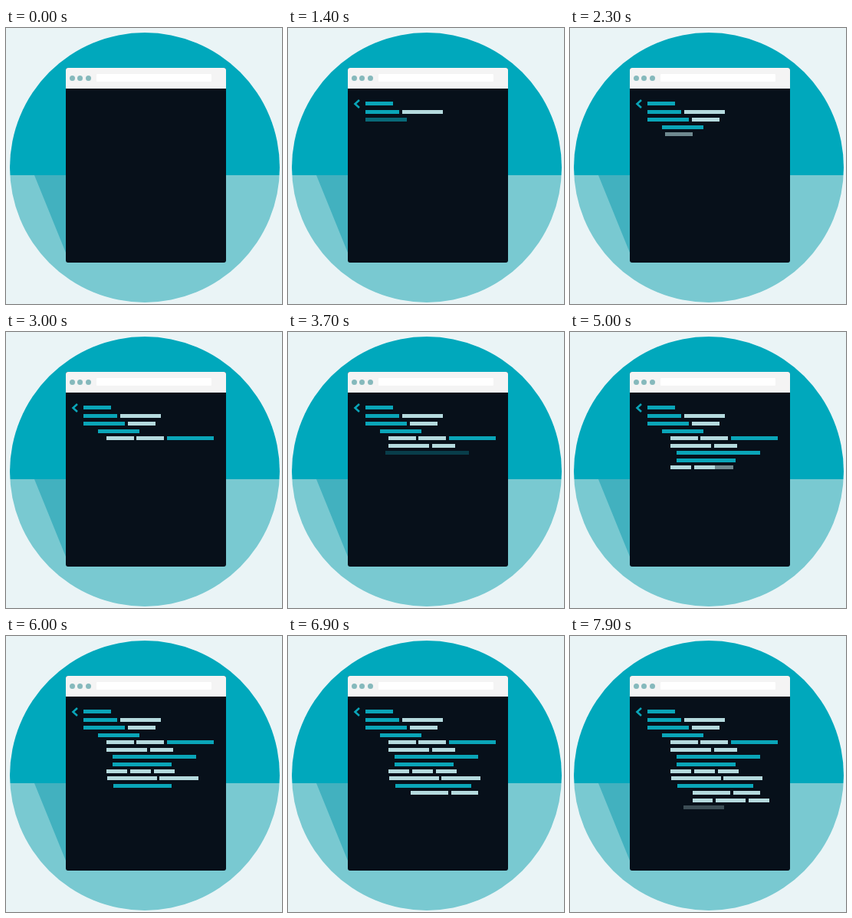
These frames come from a looping animation (360x360 px, 8000 ms). An HTML page:

```html
<!DOCTYPE html>
<html lang="en">
<head>
<meta charset="utf-8">
<title>Code window</title>
<style>
  html, body { margin: 0; width: 100%; height: 100%; overflow: hidden; background: #eaf4f6; }
  svg { display: block; width: 100vw; height: 100vh; }
</style>
</head>
<body>
<svg viewBox="0 0 360 360">
  <defs>
    <clipPath id="disc"><circle cx="181" cy="182" r="176"/></clipPath>
  </defs>
  <g clip-path="url(#disc)">
    <rect width="360" height="192" fill="#00a8bc"/>
    <rect y="192" width="360" height="168" fill="#79c9d1"/>
    <path d="M37 192H80V298Z" fill="#42b1bf"/>
  </g>
  <rect x="78" y="52" width="209" height="254" rx="3" fill="#07101a"/>
  <path d="M78 79V55a3 3 0 0 1 3-3H284a3 3 0 0 1 3 3V79Z" fill="#f4f4f4"/>
  <g fill="#86b9bc">
    <circle cx="86.5" cy="65.5" r="3.5"/>
    <circle cx="96.5" cy="65.5" r="3.5"/>
    <circle cx="107.5" cy="65.5" r="3.5"/>
  </g>
  <rect x="118" y="60" width="150" height="10" rx="1" fill="#fff"/>
  <g id="code">
    <path d="M93 94L87.5 99L93 104" fill="none" stroke="#0aa5b8" stroke-width="2.6"/>
  </g>
</svg>
<script>
const LOOP = 8000, TICK = 100, GAP = 300, FIRST_SLIDE = 5;
const TEAL = '#0aa5b8', PALE = '#b5dade';

// Each row: top, then [left, right, colour] in typing order
const rows = [
  [96, [101, 137, TEAL]],
  [107, [101, 145, TEAL], [149, 202, PALE]],
  [117, [101, 155, TEAL], [159, 195, PALE]],
  [127, [120, 174, TEAL]],
  [136, [131, 167, PALE], [170, 206, PALE], [210, 271, TEAL]],
  [146, [131, 184, PALE], [188, 218, PALE]],
  [155, [139, 248, TEAL]],
  [165, [139, 216, TEAL]],
  [174, [131, 158, PALE], [162, 189, PALE], [193, 220, PALE]],
  [183, [132, 197, PALE], [200, 251, PALE]],
  [193, [140, 216, TEAL], [216, 239, TEAL]],
  [202, [160, 209, PALE], [213, 248, PALE]],
  [212, [160, 186, PALE], [190, 229, PALE], [233, 260, PALE]],
  [221, [160, 213, PALE]]
];

// Entrance of one part, one entry per tick
const entrance = [
  { opacity: 0.3, shift: -12 },
  { opacity: 0.6, shift: -7 },
  { opacity: 1, shift: 0 }
];

const code = document.getElementById('code');
for (const [y, ...bars] of rows) {
  for (const [left, right, fill] of bars) {
    const bar = document.createElementNS('http://www.w3.org/2000/svg', 'rect');
    const attrs = { x: left, y, width: right - left, height: 5, fill };
    for (const name in attrs) bar.setAttribute(name, attrs[name]);
    code.append(bar);
  }
}
const parts = [...code.children];

function draw(time) {
  const tick = Math.floor((time % LOOP) / TICK);
  parts.forEach((part, i) => {
    const age = tick - (TICK + GAP * i) / TICK;
    const step = entrance[Math.min(age, entrance.length - 1)];
    const shift = step && i >= FIRST_SLIDE ? step.shift : 0;
    part.setAttribute('opacity', step ? step.opacity : 0);
    part.setAttribute('transform', `translate(${shift} 0)`);
  });
}

const start = performance.now();
function frame() {
  draw(performance.now() - start);
  requestAnimationFrame(frame);
}
frame();
</script>
</body>
</html>
```
